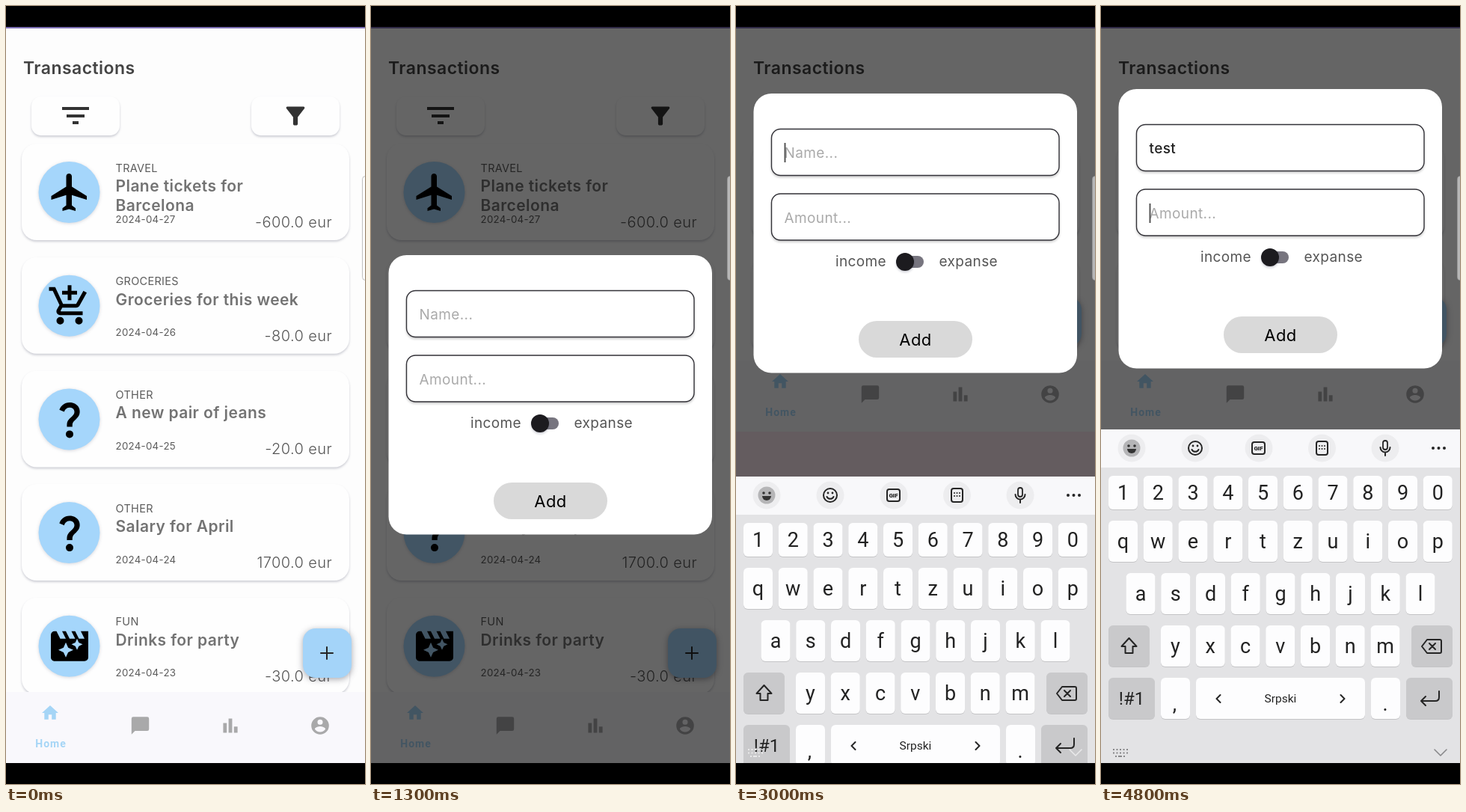
These frames come from a looping animation (480 px wide and 1040 px high, 5 s). An HTML page:

```html
<!DOCTYPE html>
<html lang="en">
<head>
<meta charset="utf-8">
<style>
  html, body { margin: 0; width: 100%; height: 100%; overflow: hidden; background: #000; }
  svg { display: block; width: 480px; height: 1040px; font-family: Inter, sans-serif; }
  text { letter-spacing: .02em; }
  .soft { filter: drop-shadow(0 2px 4px #2236); }
  .card { filter: drop-shadow(0 2px 1.5px #24284a38); }
  .badge { filter: drop-shadow(0 1px 2px #24284a30); }
  .head { font-size: 23px; font-weight: 600; fill: #444; }
  .title { font-size: 21px; font-weight: 600; fill: #737373; }
  .kind { font-size: 14.5px; fill: #5c5c5c; }
  .date { font-size: 13.3px; fill: #5c5c5c; }
  .sum { font-size: 20px; font-weight: 300; fill: #555; text-anchor: end; }
  .home { font: 700 14px Roboto, sans-serif; letter-spacing: 1px; fill: #a5d5f6; text-anchor: middle; }
  .hint, .typed { font-size: 19px; fill: #aaa; }
  .typed { fill: #222; font-weight: 500; }
  .label { font-size: 19px; fill: #555; }
  .add { font-size: 22px; text-anchor: middle; }
  .field { fill: #fff; stroke: #333238; stroke-width: 1.4; filter: drop-shadow(0 2px 1.5px #0003); }
  .key { filter: drop-shadow(0 1.5px .7px #0002); }
  .glyph { font: 27px Roboto, sans-serif; letter-spacing: 0; text-anchor: middle; fill: #222; }
  .line { fill: none; stroke: #252525; stroke-width: 2; stroke-linejoin: round; stroke-linecap: round; }
</style>
</head>
<body>
<svg id="stage" viewBox="0 0 480 1040"></svg>
<script>
const $ = id => document.getElementById(id);
const rect = (x, y, w, h, r, fill, more = '') =>
  `<rect x="${x}" y="${y}" width="${w}" height="${h}" rx="${r}" fill="${fill}" ${more}/>`;
const disc = (x, y, r, fill, more = '') => `<circle cx="${x}" cy="${y}" r="${r}" fill="${fill}" ${more}/>`;
const text = (x, y, cls, s, more = '') => `<text x="${x}" y="${y}" class="${cls}" ${more}>${s}</text>`;
const line = (d, more = '') => `<path class="line" d="${d}" ${more}/>`;
// Draws a shape from a 24-unit box, centred on x, y.
const icon = (x, y, k, d, fill = '#000') =>
  `<path transform="translate(${x} ${y}) scale(${k}) translate(-12 -12)" d="${d}" fill="${fill}"/>`;

const SKY = '#a5d6fb', GREY = '#a9a9aa';
const shapes = {
  plane: 'M21.2 16v-2l-8-5V3.5c0-.83-.67-1.5-1.5-1.5s-1.500.67-1.500 1.500V9l-8 5v2l8-2.5V19l-2 1.5V22l3.5-1 3.5 1v-1.5l-2-1.500v-5.5l8 2.5z',
  cart: 'M11 9h2V6h3V4h-3V1h-2v3H8v2h3zm-4 9a2 2 0 100 4 2 2 0 000-4zm10 0a2 2 0 100 4 2 2 0 000-4zm-9.8-3.3l.9-1.7h7.4c.8 0 1.4-.4 1.8-1l3.9-7L19.4 4 15.5 11h-7L4.3 2H1v2h2l3.6 7.6-1.4 2.4C4.5 15.4 5.5 17 7 17h12v-2H7.4z',
  query: 'M11.07 12.85c.77-1.39 2.25-2.21 3.11-3.44.91-1.29.4-3.7-2.18-3.7-1.69 0-2.52 1.28-2.87 2.34L6.54 6.96C7.25 4.83 9.18 3 12 3c2.35 0 3.96 1.07 4.78 2.41.7 1.15 1.11 3.3.03 4.9-1.2 1.77-2.35 2.31-2.97 3.45-.25.46-.35.76-.35 2.24h-2.9c0-.78-.13-2.05.48-3.15zM14 20a2 2 0 11-4 0 2 2 0 014 0z',
  clapper: 'M18 4l2 4h-3l-2-4h-2l2 4h-3l-2-4H8l2 4H7L5 4H4a2 2 0 00-2 2v12c0 1.1.9 2 2 2h16a2 2 0 002-2V4z',
  sparks: 'M11.25 15.25L10 18l-1.25-2.75L6 14l2.75-1.25L10 10l1.25 2.75L14 14zM16.94 11.94L16 14l-.94-2.06L13 11l2.06-.94L16 8l.94 2.06L19 11z',
  funnel: 'M4.25 5.6L10 13v6c0 .55.45 1 1 1h2c.55 0 1-.45 1-1v-6l5.75-7.4c.5-.65 0-1.6-.8-1.6H5c-.8 0-1.3.95-.75 1.6z',
  house: 'M10 20v-6h4v6h5v-8h3L12 3 2 12h3v8z',
  chat: 'M20 2H4a2 2 0 00-2 2v18l4-4h14a2 2 0 002-2V4a2 2 0 00-2-2z',
  bars: 'M4 9h4v11H4zM16 13h4v7h-4zM10 4h4v16h-4z',
  user: 'M12 2a10 10 0 100 20 10 10 0 000-20zm0 3a3 3 0 110 6 3 3 0 010-6zm0 14.2c-2.5 0-4.7-1.3-6-3.2 0-2 4-3.1 6-3.1s6 1.1 6 3.1c-1.3 1.9-3.5 3.2-6 3.2z'
};

const entries = [
  ['plane', 'TRAVEL', ['Plane tickets for', 'Barcelona'], 27, '-600.0'],
  ['cart', 'GROCERIES', ['Groceries for this week'], 26, '-80.0'],
  ['query', 'OTHER', ['A new pair of jeans'], 25, '-20.0'],
  ['query', 'OTHER', ['Salary for April'], 24, '1700.0'],
  ['clapper', 'FUN', ['Drinks for party'], 23, '-30.0']
];
const card = ([shape, kind, title, day, sum], i) => `<g transform="translate(0 ${i * 151.7})">
  ${rect(21, 184, 438, 129, 20, '#fefefe', 'class="card"')}
  ${disc(84.5, 249, 41, SKY, 'class="badge"')}
  ${icon(85, 249, 2.5, shapes[shape])}${shape == 'clapper' ? icon(85, 249, 2.5, shapes.sparks, SKY) : ''}
  ${text(146.5, 221.5, 'kind', kind)}
  ${title.map((s, n) => text(146.5, 248 + n * 25.5, 'title', s)).join('')}
  ${text(146.5, 289.5, 'date', '2024-04-' + day)}
  ${text(436, 296, 'sum', sum + ' eur')}</g>`;

const page = `${rect(0, 28, 480, 984, 0, '#fdfdfd')}${rect(0, 28, 480, 2, 0, '#7d70b4')}
  ${text(23, 91, 'head', 'Transactions')}
  ${rect(34, 121, 118, 52, 13, '#fefefe', 'class="card"')}${rect(328, 121, 118, 52, 13, '#fefefe', 'class="card"')}
  ${rect(75, 135, 36, 4, 0, '#333')}${rect(81, 145, 24, 4, 0, '#333')}${rect(89, 154, 8, 4, 0, '#333')}
  ${icon(387, 147, 1.55, shapes.funnel, '#333')}
  ${entries.map(card).join('')}
  <g id="bottom">${rect(0, 1000, 480, 470, 0, '#fbe8ee')}
    ${rect(0, 917, 480, 95, 0, '#f9f8fc')}
    <g class="soft">${rect(397, 832, 65, 66, 17, '#a4d4f9')}</g>
    ${line('M421 865h16m-8-8v16', 'stroke-linecap="butt"')}
    ${icon(59, 945, 1.1, shapes.house, '#a5d5f6')}${text(60, 991, 'home', 'Home')}
    ${icon(179.5, 962, 1.17, shapes.chat, GREY)}${icon(300, 962, 1.2, shapes.bars, GREY)}
    ${icon(420, 962, 1.18, shapes.user, GREY)}</g>`;

const dialog = `<g id="dialog">${rect(23.5, 333, 432.5, 373.5, 24, '#fff')}
  ${rect(47.5, 380.5, 384.5, 62, 12, '#fff', 'class="field"')}${rect(47.5, 467, 384.5, 62, 12, '#fff', 'class="field"')}
  ${text(64.5, 419, 'hint', 'Name...', 'id="name"')}${text(64.5, 505.5, 'hint', 'Amount...')}
  ${rect(0, 399, 2, 26, 0, '#555', 'id="caret"')}
  ${text(201, 564, 'label', 'income', 'text-anchor="end"')}${text(271.5, 564, 'label', 'expanse')}
  ${rect(219, 550, 32, 16, 8, '#77757f')}${disc(226, 558, 12, '#1c1b1f', 'class="card"')}
  ${rect(164, 637, 152, 49, 24.5, '#d9d9d9')}${text(240, 669.5, 'add', 'Add')}</g>`;

const key = (x, y, w, h, s = '', fill = '#fdfdfe', size = 27) =>
  `<g>${rect(x, y, w, h, 6, fill, `class="key" id="key-${s}"`)}${text(x + w / 2, y + h / 2 + size * .34, 'glyph', s, `style="font-size:${size}px"`)}</g>`;
const row = (chars, x, y, h = 55) => [...chars].map((c, i) => key(x + i * 46.75, y, 39, h, c)).join('');
const DARK = '#c9c9cb';

const board = `<g id="board">${rect(0, 566, 480, 500, 0, '#e3e3e5')}${rect(0, 566, 480, 51, 0, '#f8f8fa')}
  ${[41, 126, 211, 295.5, 380].map(x => disc(x, 591, 18.5, '#ededef')).join('')}
  ${disc(41, 591, 11.5, '#b5b5b7')}${disc(37, 588, 1.8, '#333')}${disc(45, 588, 1.8, '#333')}
  <path d="M35 592h12a6 6 0 01-12 0z" fill="#333"/>
  ${disc(126, 591, 9, 'none', 'stroke="#252525" stroke-width="2"')}${disc(123, 588, 1.4, '#252525')}${disc(129, 588, 1.4, '#252525')}
  ${line('M121.5 593a5 5 0 009 0')}
  ${rect(202, 583, 17, 16, 3, 'none', 'stroke="#252525" stroke-width="2"')}
  ${text(210.5, 594, 'glyph', 'GIF', 'style="font-size:8px;font-weight:800"')}
  ${rect(288, 582, 15, 18, 3, 'none', 'stroke="#252525" stroke-width="2"')}
  ${[0, 1, 2, 3, 4, 5].map(i => disc(292 + i % 3 * 3.5, 588 + (i > 2) * 4, 1, '#252525')).join('')}
  ${rect(377, 581, 6, 12, 3, 'none', 'stroke="#252525" stroke-width="1.8"')}${line('M373.5 590a6.5 6.5 0 0013 0M380 597v4')}
  ${[444, 451.5, 459].map(x => disc(x, 591, 2, '#252525')).join('')}
  ${row('1234567890', 10, 628, 45)}${row('qwertzuiop', 10, 688)}${row('asdfghjkl', 33.5, 758)}${row('yxcvbnm', 80, 828)}
  ${key(10, 828, 55, 55, '', DARK)}${line('M37.5 845l-10 11h5v9h10v-9h5z')}
  ${key(415, 828, 55, 55, '', DARK)}${line('M436 847h17q2 0 2 2v14q0 2-2 2h-17l-7-9zM439 852l8 8m0-8l-8 8')}
  ${key(10, 898, 62, 55, '!#1', DARK, 24)}${key(80, 898, 39, 55)}${text(98.5, 942, 'glyph', ',')}
  ${key(127, 898, 226, 55, 'Srpski', '#fdfdfe', 15.5)}${line('M159.5 921l-5 5 5 5M320.5 921l5 5-5 5')}
  ${key(361, 898, 39, 55)}${text(380, 942, 'glyph', '.')}
  ${key(408, 898, 62, 55, '', DARK)}${line('M452 916v8q0 5-5 5h-19m6-6l-6 6 6 6')}</g>
  <g id="tray">${[0, 1, 2].map(r => line(`M${r == 2 ? 19 : 16} ${994 + r * 4.5}h${r == 2 ? 13 : 20}`,
    `style="stroke:inherit;stroke-linecap:butt" stroke-dasharray="${r == 2 ? '2 2 5 2' : '2 2.5'}"`)).join('')}
  ${line('M446 994l8 8 8-8', 'style="stroke:inherit;stroke-width:1.6"')}</g>`;

$('stage').innerHTML = `${page}${rect(0, 28, 480, 984, 0, '#000', 'id="dim"')}
  ${rect(476.5, 227.5, 12, 139, 4, '#fff8', 'stroke="#9999"')}
  ${dialog}${board}${rect(0, 1012, 480, 28, 0, '#000')}`;

const ramp = (t, from, to) => Math.min(1, Math.max(0, (t - from) / (to - from)));
const remain = (t, from, to) => (1 - ramp(t, from, to)) ** 3;
const strokes = [['t', 3600], ['e', 3800], ['s', 4000], ['t', 4200]];
const FOCUS = 2700, OPEN = 2890, NEXT = 4500;
const marks = [FOCUS, ...strokes.map(s => s[1]), NEXT];
const shift = (id, y) => $(id).setAttribute('transform', `translate(0 ${Math.round(y)})`);
const show = (id, on) => $(id).style.display = on ? '' : 'none';

function draw(now) {
  const t = Math.floor(now % 5000 / 100) * 100;
  const open = t >= OPEN, slide = 446 * remain(t, OPEN, 3120);

  $('dim').style.opacity = .6 * ramp(t, 600, 900);
  $('dialog').style.opacity = ramp(t, 640, 804);
  shift('dialog', t < 900 ? 1 : -222 * (1 - remain(t, OPEN, 3047)));
  shift('bottom', open ? -443 : 0);
  shift('board', slide);
  show('board', open);
  show('tray', open);
  $('tray').style.stroke = slide > 1 ? '#fff9' : '#88888a';

  const typed = strokes.filter(s => t >= s[1]).map(s => s[0]).join('');
  const name = $('name');
  name.textContent = typed || 'Name...';
  name.setAttribute('class', typed ? 'typed' : 'hint');
  for (const [c] of strokes)
    $('key-' + c).setAttribute('fill', strokes.some(s => s[0] == c && t >= s[1] && t < s[1] + 100) ? '#d0d0d3' : '#fdfdfe');

  const last = Math.max(...marks.filter(m => t >= m));
  show('caret', t >= FOCUS && (t - last) % 1000 < 500);
  $('caret').setAttribute('x', 64.5 + (typed && t < NEXT ? name.getComputedTextLength() : 0));
  $('caret').setAttribute('y', t < NEXT ? 399 : 486);
}

const start = performance.now();
(function tick() {
  draw(performance.now() - start);
  requestAnimationFrame(tick);
})();
</script>
</body>
</html>
```
